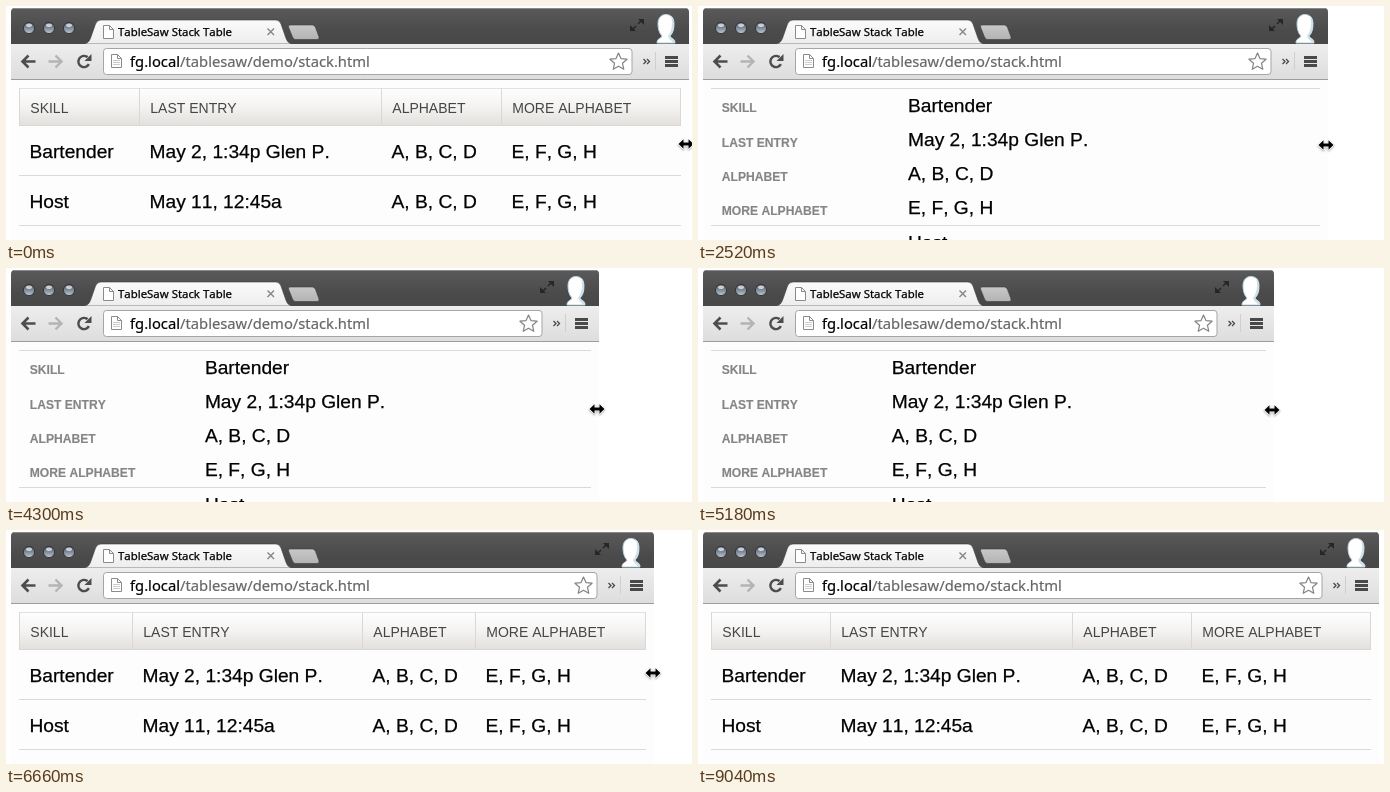
These frames come from a looping animation (686 px wide and 234 px high, 9380 ms). An HTML page with a canvas:

```html
<!DOCTYPE html>
<html lang="en">
<head>
<meta charset="utf-8">
<title>Stack table</title>
<style>
  html, body { margin: 0; width: 686px; height: 234px; overflow: hidden; background: #fff; }
  canvas, svg { position: absolute; left: 0; top: 0; width: 686px; height: 234px; }
  text { font-family: "Liberation Sans", Arial, sans-serif; font-kerning: none; white-space: pre; }
  .ui { font-family: "Noto Sans", "Open Sans", sans-serif; }
  .tab { font-size: 11.4px; fill: #000; stroke: #000; stroke-width: .25px; }
  .url { font-size: 14.76px; fill: #666; stroke: #666; stroke-width: .2px; }
  .host { fill: #000; stroke: #000; }
  .head { font-size: 14px; fill: #454545; }
  .cell { font-size: 19.2px; fill: #000; stroke: #000; stroke-width: .25px; }
  .label { font-size: 12.1px; font-weight: bold; fill: #858585; stroke: #858585; stroke-width: .15px; }
</style>
</head>
<body>
<canvas id="stage"></canvas>
<svg id="words" viewBox="0 0 686 234">
  <text class="ui tab" x="112" y="30">TableSaw Stack Table</text>
  <text class="ui url" x="124" y="61"><tspan class="host">fg.local</tspan>/tablesaw/demo/stack.html</text>
</svg>
<script>
const LOOP = 9380, TICK = 147.8, LEFT = 5, TABLE = 13, BREAK = 645;

// tick, window right edge, pointer x, pointer y
const KEYS = [
  [0, 683, 680, 138], [1, 683, 679, 138], [6, 683, 679, 138],
  [10, 673, 670, 138], [14, 647, 644, 138], [17, 630, 628, 139],
  [18, 630, 628, 139], [26, 601, 599, 140], [29, 593, 591, 141],
  [34, 577, 575, 142], [35, 576, 574, 142], [36, 576, 574, 142],
  [41, 615, 615, 143], [44, 642, 642, 143], [50, 676, 674, 142],
  [51, 676, 674, 142], [55, 681, 679, 142], [56, 681, 679, 142],
  [60, 681, 673, 226], [61, 681, 673, 246]
];

const HEADS = ["SKILL", "LAST ENTRY", "ALPHABET", "MORE ALPHABET"];
const ROWS = [
  ["Bartender", "May 2, 1:34p Glen P.", "A, B, C, D", "E, F, G, H"],
  ["Host", "May 11, 12:45a", "A, B, C, D", "E, F, G, H"]
];
const COLS = [0, 0.1813, 0.5468, 0.7281];

const canvas = document.getElementById("stage");
const words = document.getElementById("words");
const ctx = canvas.getContext("2d");
const scale = window.devicePixelRatio || 1;
canvas.width = 686 * scale;
canvas.height = 234 * scale;

function svg(tag, parent) {
  return parent.appendChild(document.createElementNS("http://www.w3.org/2000/svg", tag));
}

function addText(parent, cls, str, x, y) {
  const el = svg("text", parent);
  el.setAttribute("class", cls);
  el.setAttribute("x", x);
  el.setAttribute("y", y);
  el.textContent = str;
  return el;
}

const grid = svg("g", words), stack = svg("g", words);
const heads = HEADS.map(h => addText(grid, "head", h, 0, 107));
const cells = ROWS.map((row, r) => row.map(s => addText(grid, "cell", s, 0, 152 + 50 * r)));
const values = [];
ROWS.forEach((row, r) => row.forEach((s, i) => {
  const top = 106 + 137 * r;
  addText(stack, "label", HEADS[i], 23.8, Math.round(top + 0.4 + 34.2 * i));
  values.push(addText(stack, "cell", s, 0, top + 34 * i));
}));

function pose(tick) {
  let i = 0;
  while (i < KEYS.length - 2 && KEYS[i + 1][0] <= tick) i++;
  const a = KEYS[i], b = KEYS[i + 1];
  const k = Math.min(1, (tick - a[0]) / (b[0] - a[0]));
  return [1, 2, 3].map(n => Math.round(a[n] + (b[n] - a[n]) * k));
}

function fade(y0, y1, ...colors) {
  const g = ctx.createLinearGradient(0, y0, 0, y1);
  colors.forEach((c, i) => g.addColorStop(i / (colors.length - 1), c));
  return g;
}

function rect(x, y, w, h, fill) {
  ctx.fillStyle = fill;
  ctx.fillRect(x, y, w, h);
}

function shape(d, fill, stroke, width = 1) {
  const p = new Path2D(d);
  if (fill) { ctx.fillStyle = fill; ctx.fill(p); }
  if (stroke) { ctx.strokeStyle = stroke; ctx.lineWidth = width; ctx.stroke(p); }
}

function at(x, y, draw) {
  ctx.save();
  ctx.translate(x, y);
  draw();
  ctx.restore();
}

function pageIcon(x, y) {
  at(x, y, () => shape("M.5 .5H6.5L10.5 4.5V13.5H.5ZM6.5 .5V4.5H10.5", "#fff", "#8b8b8b"));
}

function light(x) {
  ctx.beginPath();
  ctx.arc(x, 22, 5.6, 0, 7);
  ctx.fillStyle = fade(16, 28, "#4c5560", "#7d8a98", "#c3ced9");
  ctx.fill();
  ctx.strokeStyle = "#343638";
  ctx.lineWidth = 1;
  ctx.stroke();
  ctx.beginPath();
  ctx.ellipse(x, 19.3, 3, 1.8, 0, 0, 7);
  ctx.fillStyle = "rgba(255,255,255,.65)";
  ctx.fill();
}

function drawTabs(w) {
  ctx.beginPath();
  ctx.roundRect(LEFT, 2, w - LEFT, 40, [4, 4, 0, 0]);
  ctx.fillStyle = fade(2, 38, "#5a5a5a", "#525252", "#4a4a4a", "#484848");
  ctx.fill();
  rect(LEFT + 3, 2, w - LEFT - 6, 1, "#8a8a8a");
  [23, 43, 63].forEach(light);

  shape("M78 38C83 37 84 34 86 28L89.500 18Q91 14 95 14H270Q273.500 14 275 18L278.500 28C280.500 34 281.500 37 286 38Z",
    fade(14, 38, "#fbfbfb", "#ededed"), "#3c3c3c", 0.6);
  pageIcon(97, 19);
  shape("M261.500 22.500L268 29M268 22.500L261.500 29", null, "#858585", 1.4);
  shape("M284 19H306.500Q308.500 19 309.500 21.500L313 31Q313.500 33.500 311 33.500H289.500Q287.500 33.500 286.500 31L282.500 21Q282 19 284 19Z",
    fade(19, 34, "#c8c8c8", "#b2b2b2"), "#3f3f3f", 0.6);

  at(w - 52, 19, () => {
    shape("M1 -1L5 -5M-1 1L-5 5", null, "#262626", 1.6);
    shape("M1 -6H7V0ZM-1 6H-7V0Z", "#262626");
  });

  at(w - 23, 0, () => {
    shape("M-9 37C-9 32 -5 33 -4 30C-7 27 -8 22 -8 18C-8 11 -4 8.500 0 8.500C5 8.500 8 12 8 18C8 23 7 27 4 30C5 33 9 32 9 37Z",
      "#fff", "#b9d3e0", 1);
    shape("M4 30C7 27 8 23 8 18C8 14 7 11 5 10C7 17 6 25 2 30C3 34 6 34 7 37H9C9 32 5 33 4 30Z", "#cfe0e9");
  });
}

function drawToolbar(w) {
  rect(LEFT, 38, w - LEFT, 35, fade(38, 73, "#eeeeee", "#dddddd"));
  rect(LEFT, 73, w - LEFT, 1, "#9d9d9d");
  const arrow = "M1 -6L-5 0L1 6M-5 0H8";
  at(21.5, 55.5, () => shape(arrow, null, "#4d4d4d", 2.6));
  at(50.5, 55.5, () => { ctx.scale(-1, 1); shape(arrow, null, "#b4b4b4", 2.4); });
  ctx.beginPath();
  ctx.arc(78, 55.5, 5.6, 0.5, 5.4);
  ctx.strokeStyle = "#4d4d4d";
  ctx.lineWidth = 2.4;
  ctx.stroke();
  shape("M85.500 48V55H78.500Z", "#4d4d4d");

  ctx.beginPath();
  ctx.roundRect(97.5, 42.5, w - 57 - 97.5, 26, 3);
  ctx.fillStyle = "#fff";
  ctx.fill();
  ctx.strokeStyle = "#a5a5a5";
  ctx.lineWidth = 1;
  ctx.stroke();
  pageIcon(105, 48);
  for (let y = 54; y < 60; y += 2) rect(107, y, 7, 1, "#cccccc");

  at(w - 70.5, 56, () => {
    ctx.beginPath();
    for (let i = 0; i < 10; i++) {
      const r = i % 2 ? 4.2 : 9, a = i * Math.PI / 5;
      ctx.lineTo(r * Math.sin(a), -r * Math.cos(a));
    }
    ctx.closePath();
    ctx.lineJoin = "round";
    ctx.strokeStyle = "#848484";
    ctx.lineWidth = 1.2;
    ctx.stroke();
  });
  at(w - 42.5, 55.5, () => shape("M-3 -2.500L-.5 0L-3 2.500M.5 -2.500L3 0L.5 2.500", null, "#484848", 1.3));
  rect(w - 34, 46, 1, 18, "#cfcfcf");
  for (let y = 50; y < 61; y += 4) rect(w - 24, y, 13, 3, "#494949");
}

function drawGrid(w) {
  const width = w - 21;
  rect(TABLE, 82, width, 38, fade(82, 120, "#fefefe", "#f4f3f2", "#e2dfdc"));
  rect(TABLE, 82, width, 1, "#e3e1df");
  rect(TABLE, 119, width, 1, "#d9d6d3");
  const edges = COLS.map(c => Math.floor(TABLE + c * width + 0.2));
  [...edges, TABLE + width - 1].forEach(x => rect(x, 82, 1, 38, "#dad7d4"));
  [169, 219].forEach(y => rect(TABLE, y, width, 1, "#dadada"));
  edges.forEach((x, i) => {
    heads[i].setAttribute("x", x + 11.3);
    cells.forEach(row => row[i].setAttribute("x", x + 10.5));
  });
}

function drawStack(w) {
  const width = w - 21;
  [82, 219].forEach(y => rect(TABLE, y, width, 1, "#dadada"));
  values.forEach(v => v.setAttribute("x", 27.3 + 0.3 * width));
}

function drawPointer(x, y) {
  at(x, y, () => {
    const d = "M-7.500 0L-2.500 -4.800V-1.500H2.500V-4.800L7.500 0L2.500 4.800V1.500H-2.500V4.800Z";
    ctx.lineJoin = "round";
    ctx.shadowColor = "rgba(0,0,0,.35)";
    ctx.shadowBlur = 2 * scale;
    ctx.shadowOffsetY = scale;
    shape(d, null, "#fff", 1.5);
    ctx.shadowColor = "transparent";
    shape(d, "#000");
  });
}

function frame(now) {
  const [w, x, y] = pose(Math.floor((now % LOOP) / TICK));
  const narrow = w < BREAK;
  ctx.setTransform(scale, 0, 0, scale, 0, 0);
  rect(0, 0, 686, 234, "#fff");
  rect(LEFT, 74, w - LEFT, 160, "#fdfdfd");
  drawTabs(w);
  drawToolbar(w);
  (narrow ? drawStack : drawGrid)(w);
  grid.style.display = narrow ? "none" : "";
  stack.style.display = narrow ? "" : "none";
  drawPointer(x, y);
}

const start = performance.now();
function loop() {
  frame(performance.now() - start);
  requestAnimationFrame(loop);
}
loop();
</script>
</body>
</html>
```
